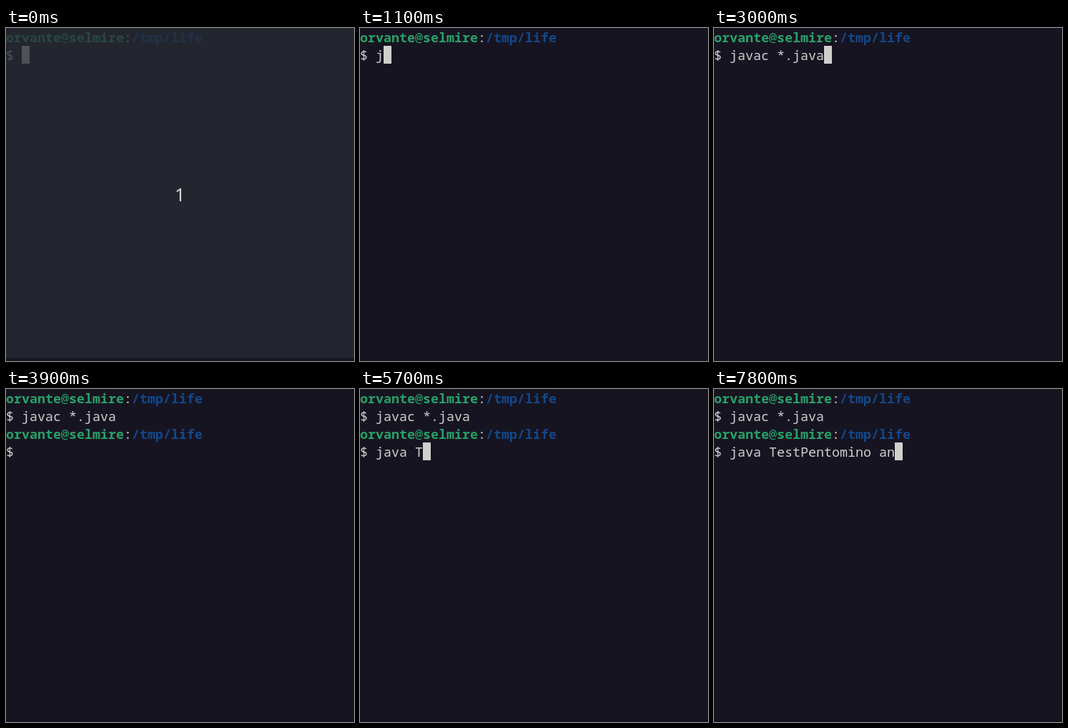
Recreate the animation shown at these times as an HTML page. Size 487 px wide and 467 px high, loop 8000 ms.

```html
<!DOCTYPE html>
<html lang="en">
<head>
<meta charset="utf-8">
<title>Terminal session</title>
<style>
  html, body { margin: 0; width: 100%; height: 100%; overflow: hidden; background: #171421; }
  #stage { position: relative; width: 487px; height: 467px; overflow: hidden; }
  #screen {
    color: #d0cfcc;
    font: 18.3333px/25px "Noto Sans Mono", monospace;
    font-variant-ligatures: none;
  }
  .row { height: 25px; white-space: pre; }
  .user, .path { font-weight: 700; }
  .user { color: #26a269; }
  .at { font-weight: 400; }
  .path { color: #12488b; }
  #cursor { position: absolute; width: 11px; height: 25px; background: #d0cfcc; }
  #countdown {
    position: absolute; left: 0; top: 0; width: 487px; height: 463px;
    background: rgba(40, 44, 52, .76); color: #d9d9d8;
    font: 500 25px/467px "Noto Sans", sans-serif; text-align: center;
  }
</style>
</head>
<body>
<div id="stage">
  <div id="screen">
    <div class="row"><span class="user">orvante<span class="at">@</span>selmire</span>:<span class="path">/tmp/life</span></div>
    <div class="row">$ <span id="compile"></span></div>
    <div id="second" hidden>
      <div class="row"><span class="user">orvante<span class="at">@</span>selmire</span>:<span class="path">/tmp/life</span></div>
      <div class="row">$ <span id="run"></span></div>
    </div>
  </div>
  <div id="cursor"></div>
  <div id="countdown">1</div>
</div>
<script>
const LOOP = 8000, CELL = 11, ROW = 25, COUNTDOWN_END = 100;
const COMPILE = "javac *.java", RUN = "java TestPentomino an";
const FIRST = 0, WAIT = 1, SECOND = 2;

// [time, phase, typed characters, cursor shown]
const steps = [
  [0, FIRST, 0, 1], [300, FIRST, 0, 0], [900, FIRST, 0, 1],
  [1100, FIRST, 1, 1], [1200, FIRST, 2, 1], [1400, FIRST, 4, 1],
  [1600, FIRST, 5, 1], [1700, FIRST, 6, 1], [2100, FIRST, 7, 1],
  [2500, FIRST, 8, 1], [2800, FIRST, 9, 1], [2900, FIRST, 10, 1],
  [3000, FIRST, 12, 1], [3400, WAIT, 0, 1],
  [3900, SECOND, 0, 0], [4500, SECOND, 0, 1],
  [4900, SECOND, 1, 1], [5000, SECOND, 2, 1], [5100, SECOND, 3, 1],
  [5200, SECOND, 4, 1], [5500, SECOND, 5, 1], [5700, SECOND, 6, 1],
  [5800, SECOND, 7, 1], [6100, SECOND, 8, 1], [6200, SECOND, 9, 1],
  [6400, SECOND, 10, 1], [6500, SECOND, 11, 1], [6700, SECOND, 19, 1],
  [7100, SECOND, 19, 0], [7400, SECOND, 19, 1], [7500, SECOND, 20, 1],
  [7800, SECOND, 21, 1]
];

const el = id => document.getElementById(id);
const compile = el("compile"), run = el("run"), second = el("second");
const cursor = el("cursor"), countdown = el("countdown");
let shown = null;

function draw(step) {
  const [, phase, count, cursorOn] = step;
  compile.textContent = phase === FIRST ? COMPILE.slice(0, count) : COMPILE;
  run.textContent = phase === SECOND ? RUN.slice(0, count) : "";
  second.hidden = phase !== SECOND;
  cursor.style.left = (phase === WAIT ? 0 : count + 2) * CELL + "px";
  cursor.style.top = (phase + 1) * ROW + "px";
  cursor.hidden = !cursorOn;
}

function tick() {
  const t = performance.now() % LOOP;
  const step = steps.findLast(s => s[0] <= t);
  if (step !== shown) draw(shown = step);
  countdown.hidden = t >= COUNTDOWN_END;
  requestAnimationFrame(tick);
}
tick();
</script>
</body>
</html>
```
